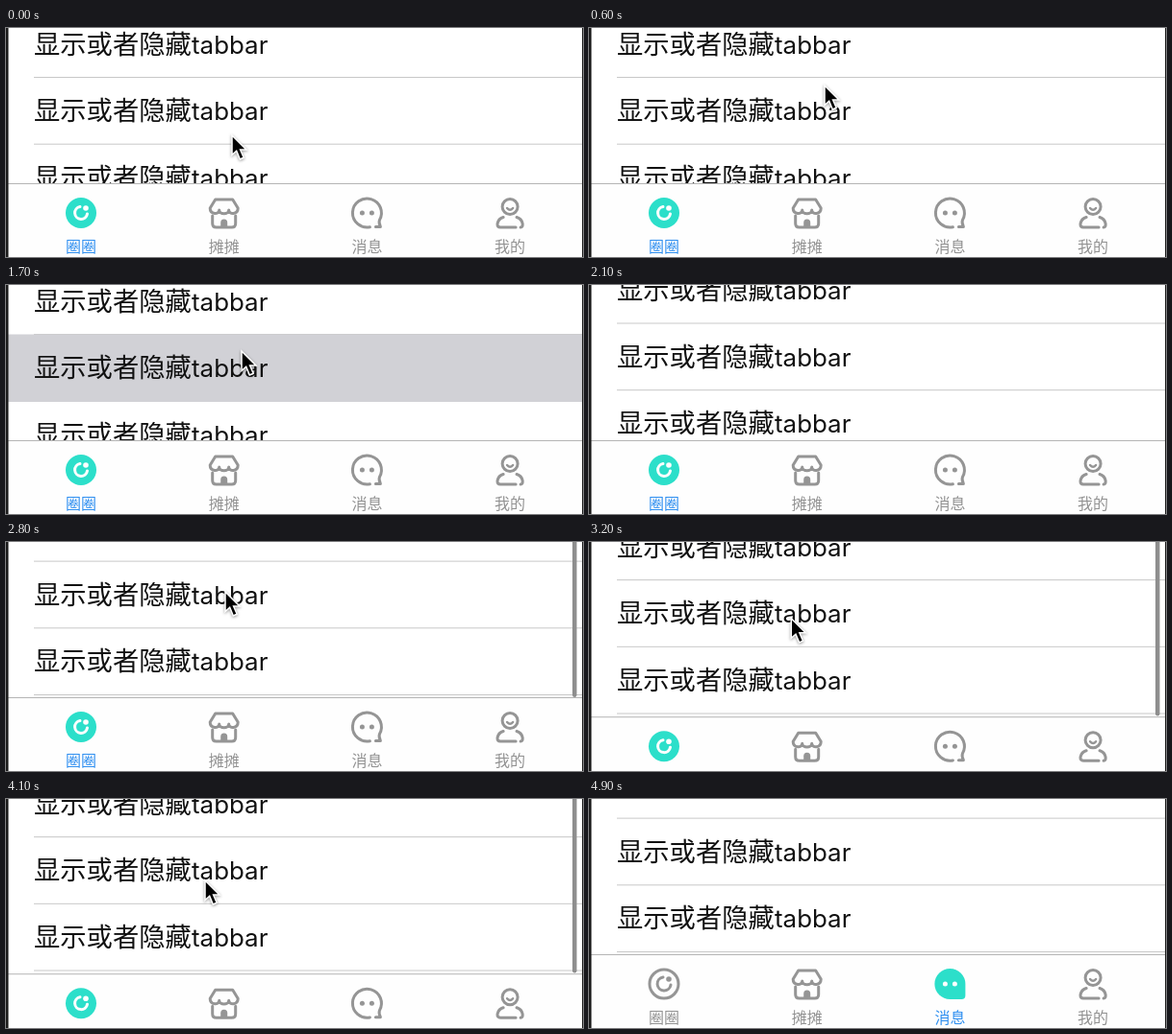
These frames come from a looping animation (600 px wide and 239 px high, 5000 ms). An HTML page:

```html
<!DOCTYPE html>
<html lang="zh-CN">
<head>
<meta charset="utf-8">
<title>tabbar</title>
<style>
  html, body { margin: 0; width: 100%; height: 100%; overflow: hidden; background: #fff; }
  svg { display: block; width: 600px; height: 239px; }
  text { font-family: "Noto Sans CJK SC", "Noto Sans CJK", sans-serif; }
  #rows text { font-size: 27.3px; fill: #111; }
  #rows tspan { font-family: Inter, sans-serif; font-size: 25.9px; }
  .tab text { font-size: 16px; text-anchor: middle; fill: #929292; }
  .tab.on text { fill: #2f8ff0; }
  .icon { fill: none; stroke: #959595; stroke-width: 3; stroke-linecap: round; stroke-linejoin: round; }
  .icon .dot { fill: #959595; stroke: none; }
  .full, .on .line { display: none; }
  .on .full { display: inline; stroke: #fff; }
  .on .full .disc { fill: #2cdfca; stroke: none; }
  .on .full .dot { fill: #fff; }
  #cursor { filter: drop-shadow(0 1.5px 1.5px #0006); }
</style>
</head>
<body>
<svg viewBox="0 0 600 239">
  <g id="list">
    <g id="lines" stroke="#c8c8c8"></g>
    <rect id="press" x="2" width="598" height="70.5" fill="#d1d1d6"/>
    <g id="rows"></g>
  </g>
  <rect id="thumb" x="589" y="-10" width="4.5" rx="2.2" fill="#8e8e8e"/>
  <g id="bar">
    <rect y="162" width="600" height="78" fill="#fefefe"/>
    <path d="M2 162.5H600" stroke="#b5b5b5"/>
    <g class="tab">
      <g class="icon line">
        <circle r="15"/>
        <path d="M-1-7A7 7 0 1 0 7 1"/>
        <circle class="dot" cx="5" cy="-5" r="2.8"/>
      </g>
      <g class="icon full">
        <circle class="disc" r="16"/>
        <path d="M-1-6.5A6.5 6.5 0 1 0 6.5 1"/>
        <circle class="dot" cx="5" cy="-5" r="2.8"/>
      </g>
      <text y="40.5">圈圈</text>
    </g>
    <g class="tab">
      <g class="icon">
        <path d="M-9-14H9L14.5-5C14.5 2 5 2 5-3C5 2-5 2-5-3C-5 2-14.5 2-14.5-5Z"/>
        <path d="M-12 3V11Q-12 15-8 15H8Q12 15 12 11V3"/>
        <path class="dot" d="M-3.5 15V10A3.5 3.5 0 0 1 3.5 10V15Z"/>
      </g>
      <text y="40.5">摊摊</text>
    </g>
    <g class="tab">
      <g class="icon line">
        <path d="M3 14.7A15 15 0 1 1 13 7.5Q12 10 14 14.5H9"/>
        <circle class="dot" cx="-5" r="2.5"/>
        <circle class="dot" cx="5" r="2.5"/>
      </g>
      <g class="icon full">
        <path class="disc" d="M0 16A16 16 0 1 1 16 0V12Q16 16 12 16Z"/>
        <circle class="dot" cx="-5" r="2.5"/>
        <circle class="dot" cx="5" r="2.5"/>
      </g>
      <text y="40.5">消息</text>
    </g>
    <g class="tab">
      <g class="icon">
        <circle cy="-6.5" r="8"/>
        <path d="M-3-5Q0-1.5 3-5" stroke-width="2.5"/>
        <path d="M6 15H-10Q-13.5 15-13 11Q-12 6-7 4.5M7 4.5Q12 6 13 11Q13.5 15 11 15"/>
      </g>
      <text y="40.5">我的</text>
    </g>
  </g>
  <path d="M0 0H2.5V239H0Z" fill="#1b1b1b"/>
  <path d="M599 0H600V239H599Z" fill="#222"/>
  <path id="cursor" d="M0 0V20.5L4.7 16.3L8.3 25L12.2 23.3L8.6 15H15Z" stroke="#fff" stroke-width="1.5"/>
</svg>
<script>
const $ = id => document.getElementById(id);
const set = (id, name, value) => $(id).setAttribute(name, value);
const tabs = document.querySelectorAll('.tab');
const PITCH = 69.7, LAST = 4, LIFT = 75.3, TRAVEL = 170.8;
const TAPS = [900, 1300, 3000, 3800], DRAG = 1700, SWITCH = 4500;
// Each stop is [arrival time, x, y].
const STOPS = [[600, 245, 60], [1700, 245, 69], [2100, 245, -30], [2700, 228, 52],
               [3300, 207, 85], [4500, 375, 195], [4900, 400, 255]];

tabs.forEach((tab, i) => tab.setAttribute('transform', `translate(${78 + 148.7 * i} 193)`));
for (let i = -1; i <= LAST; i++) {
  const y = i * PITCH;
  $('lines').innerHTML += `<path d="M29 ${51.5 + y}H600"/>`;
  $('rows').innerHTML += `<text x="29" y="${26.5 + y}">显示或者隐藏<tspan x="193">tabbar</tspan></text>`;
}

// Smooth rise from 0 to 1 between two times.
function ramp(t, start, end) {
  const u = Math.min(1, Math.max(0, (t - start) / (end - start)));
  return u * u * (3 - 2 * u);
}

function cursorAt(t) {
  return STOPS.reduce(([px, py], [end, x, y]) => {
    const u = ramp(t, end - 400, end);
    return [px + (x - px) * u, py + (y - py) * u];
  }, [235, 112]);
}

function draw() {
  const t = Math.floor(performance.now() % 5000 / 100) * 100;
  // Taps hide and show the bar in turn.
  const hidden = TAPS.reduce((sum, tap, i) => sum + (i % 2 ? -1 : 1) * ramp(t, tap + 100, tap + 400), 0);
  const fling = ramp(t, 1730, 2495);
  // Only at the end of the list does hiding the bar push the rows down.
  const lift = fling * hidden * LIFT;
  const y = lift - fling * TRAVEL;
  const [cx, cy] = cursorAt(t);
  const touch = Math.max(0, ...[...TAPS, DRAG].map(tap => t < tap ? 0 : 1 - ramp(t, tap, tap + 200)));
  const row = Math.floor((cy - y + 18.2) / PITCH);

  set('list', 'transform', `translate(0 ${y})`);
  set('press', 'y', 51.5 + (row - 1) * PITCH);
  set('press', 'opacity', touch);
  set('bar', 'transform', `translate(0 ${hidden * 78})`);
  set('thumb', 'height', Math.max(0, 172 - 340 * (1 - fling) + lift));
  set('thumb', 'opacity', 1 - ramp(t, 4200, 4600));
  set('cursor', 'transform', `translate(${cx} ${cy})`);
  tabs[0].classList.toggle('on', t < SWITCH);
  tabs[2].classList.toggle('on', t >= SWITCH);
  requestAnimationFrame(draw);
}
draw();
</script>
</body>
</html>
```
